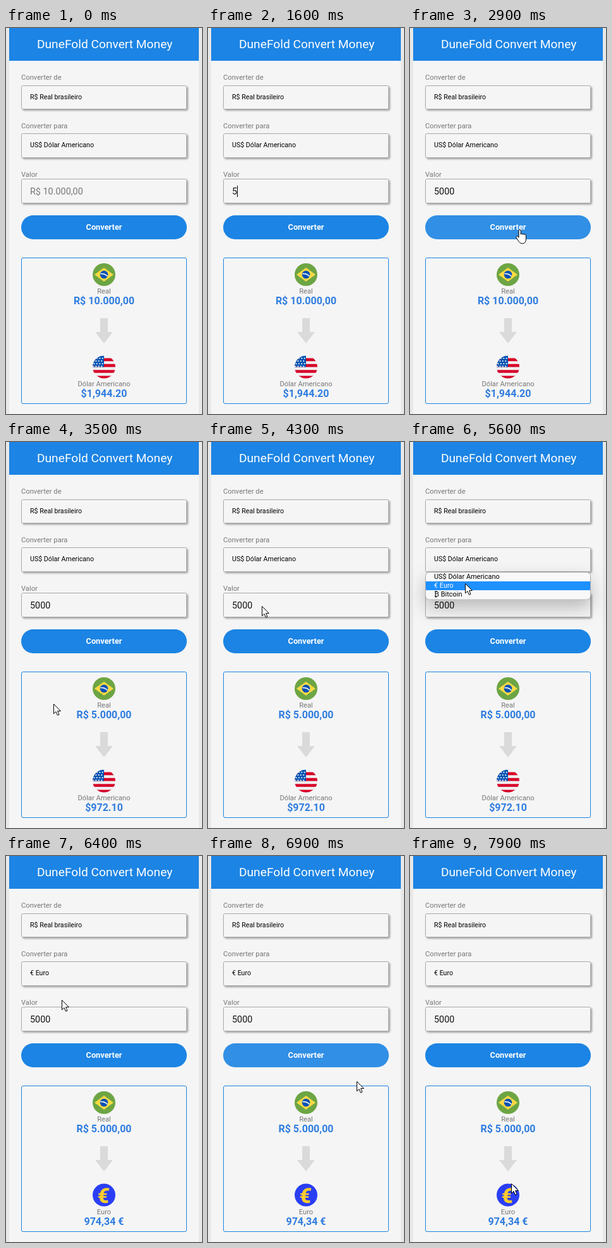
Write an HTML page that moves like this. It is 310 px wide and 612 px high and loops after 8000 ms.

```html
<!DOCTYPE html>
<html lang="pt">
<head>
<meta charset="utf-8">
<title>Convert Money</title>
<style>
  html, body { margin: 0; width: 100%; height: 100%; overflow: hidden; background: #e8e8e8; }
  svg { display: block; }
  text { font: 11.2px Roboto, sans-serif; fill: #777; white-space: pre; }
  .title { font-size: 19.2px; fill: #fff; text-anchor: end; }
  .choice { font-size: 10.67px; fill: #000; }
  .field { fill: #f5f5f5; stroke: #aaa; filter: url(#fieldShadow); }
  .center { text-anchor: middle; }
  .money { font-size: 16px; font-weight: 700; fill: #2f7de0; text-anchor: middle; }
  .action { font-size: 12.8px; font-weight: 700; fill: #fff; text-anchor: middle; }
  .option { font-size: 10.95px; fill: #000; }
  #amount { font-size: 14.4px; }
  .pointer { fill: #fff; stroke: #000; stroke-linejoin: round; }
</style>
</head>
<body>
<svg width="310" height="612" viewBox="0 0 310 612">
  <defs>
    <filter id="fieldShadow" x="-10%" y="-40%" width="120%" height="180%">
      <feDropShadow dx="2" dy="2" stdDeviation="1.5" flood-opacity=".35"/>
    </filter>
    <filter id="menuShadow" x="-30%" y="-150%" width="160%" height="450%">
      <feDropShadow dx="0" dy="12" stdDeviation="14" flood-opacity=".25"/>
    </filter>
    <clipPath id="menuClip"><rect x="25" y="207" width="260" height="43" rx="6"/></clipPath>
    <clipPath id="disc"><circle r="18"/></clipPath>
  </defs>

  <rect x="5" width="300" height="612" fill="#f5f5f5"/>
  <rect x="5" width="300" height="52" fill="#1c84e4"/>
  <text class="title" x="263.3" y="32">DuneFold Convert Money</text>

  <text x="24" y="82">Converter de</text>
  <rect class="field" x="24.5" y="91.5" width="261" height="37" rx="2"/>
  <text class="choice" x="38" y="113">R$ Real brasileiro</text>

  <text x="24" y="159">Converter para</text>
  <rect class="field" x="24.5" y="167.5" width="261" height="38" rx="2"/>
  <text class="choice" id="target" x="38" y="189"></text>

  <text x="24" y="236">Valor</text>
  <rect class="field" x="24.5" y="239.5" width="261" height="38" rx="2"/>
  <text id="amount" x="38" y="264"></text>
  <rect id="caret" y="250" width="1" height="18"/>

  <rect id="button" x="24" y="297" width="262" height="38" rx="19" fill="#1c84e4"/>
  <text class="action" x="155" y="320">Converter</text>

  <rect x="24.5" y="364.5" width="261" height="231" rx="2.5" fill="none" stroke="#1c84e4"/>
  <g transform="translate(155 391)">
    <circle r="18" fill="#6da544"/>
    <path d="M0-11L15 0L0 11L-15 0Z" fill="#ffda44"/>
    <circle r="6.3" fill="#0052b4"/>
    <path d="M-5.6-1.3Q1-2.2 5.4 2.6" fill="none" stroke="#f0f0f0" stroke-width="1.8"/>
  </g>
  <text class="center" x="155" y="421">Real</text>
  <text class="money" id="fromMoney" x="155" y="438"></text>

  <path d="M149 460H161V482H169L155 500L141 482H149Z" fill="#dadada"/>

  <g transform="translate(155 537.5)">
    <g id="dollarIcon" clip-path="url(#disc)">
      <circle r="18" fill="#f0f0f0"/>
      <path d="M-18-11.7H18M-18-2.3H18M-18 7H18M-18 16.4H18" stroke="#d80027" stroke-width="4.7"/>
      <path d="M-18-18H0V0H-18Z" fill="#0052b4"/>
      <path id="stars" fill="#f0f0f0"/>
    </g>
    <g id="euroIcon">
      <circle r="18" fill="#2a3ef5"/>
      <text class="center" x="-1" y="12" style="font-size:33px;font-weight:900;fill:#fccd2d"
        transform="skewX(-5)">€</text>
    </g>
  </g>
  <text class="center" id="currency" x="155" y="568"></text>
  <text class="money" id="toMoney" x="155" y="585"></text>

  <g id="menu">
    <rect x="24.5" y="206.5" width="261" height="43.5" rx="6" fill="#f8f8f8" stroke="#aaa"
      filter="url(#menuShadow)"/>
    <rect id="highlight" x="25" width="260" height="14" fill="#1e90ff" clip-path="url(#menuClip)"/>
    <text class="option" x="38" y="217">US$ Dólar Americano</text>
    <text class="option" x="38" y="231">€ Euro</text>
    <text class="option" x="38" y="245">₿ Bitcoin</text>
  </g>

  <g id="cursor">
    <path class="pointer" id="arrow" d="M.5.5V15.8L4 12.5L6.5 18.3L9 17.2L6.6 11.6H11.4Z"/>
    <path class="pointer" id="hand" d="M5 13V2.2a1.6 1.6 0 0 1 3.2 0V8.2a1.5 1.5 0 0 1 2.9.2a1.4 1.4 0 0 1 2.7.7a1.3 1.3 0 0 1 2.6.8V15.5Q16.4 22.8 10.6 22.8Q7 22.8 5 19.5L1 13.3C.1 11.7 2 10.4 3.2 11.5Z"/>
  </g>
</svg>
<script>
  const LOOP = 8000, STEP = 100;
  const $ = id => document.getElementById(id);
  const show = (id, on) => $(id).setAttribute('visibility', on ? 'visible' : 'hidden');
  const between = (t, a, b) => t >= a && t < b;

  // Cursor path: time, x, y
  const path = [
    [2800, 167, 319], [3300, 167, 319], [3400, 112, 380], [3500, 75, 415], [3800, 75, 415],
    [3900, 80, 390], [4000, 81, 368], [4100, 81, 368], [4200, 82, 345], [4300, 85, 260],
    [4400, 89, 188], [4900, 89, 188], [5000, 86, 187], [5200, 52, 205], [5400, 86, 217],
    [5500, 86, 217], [5600, 87, 224], [5800, 88, 228], [6700, 88, 228], [6800, 190, 312],
    [6900, 235, 357], [7000, 255, 417], [7100, 255, 417], [7200, 262, 440], [7400, 240, 535],
    [7500, 200, 563], [7600, 163, 562], [7700, 147, 545], [7900, 160, 519], [8000, 160, 519]
  ];

  function cursorAt(t) {
    const next = path.findIndex(key => key[0] > t);
    const [t0, x0, y0] = path[next - 1], [t1, x1, y1] = path[next];
    const k = (t - t0) / (t1 - t0);
    return [x0 + (x1 - x0) * k, y0 + (y1 - y0) * k];
  }

  let stars = '';
  for (let row = 0; row < 4; row++)
    for (let col = 0; col < 4; col++)
      stars += `M${-15.5 + col * 4.4 - (row % 2) * 1.5} ${-15 + row * 4.2}l1.5 1.3l-1.5 1.3l-1.5-1.3z`;
  $('stars').setAttribute('d', stars);

  function draw(t) {
    const typed = t < 1600 ? '' : t < 2000 ? '5' : t < 2200 ? '500' : '5000';
    $('amount').textContent = typed || 'R$ 10.000,00';
    $('amount').style.fill = typed ? '#111' : '#777';
    $('caret').setAttribute('x', Math.floor(38 + typed.length * 8.09));
    show('caret', between(t, 700, 1200) || between(t, 1600, 2700));

    const pressed = between(t, 3100, 3200);
    const hover = between(t, 2800, 3400) || between(t, 6800, 7000);
    $('button').setAttribute('opacity', pressed ? .8 : hover ? .9 : 1);

    const converted = t >= 3200, euro = t >= 6300;
    $('target').textContent = t >= 6200 ? '€ Euro' : 'US$ Dólar Americano';
    $('fromMoney').textContent = converted ? 'R$ 5.000,00' : 'R$ 10.000,00';
    $('toMoney').textContent = euro ? '974,34 €' : converted ? '$972.10' : '$1,944.20';
    $('currency').textContent = euro ? 'Euro' : 'Dólar Americano';
    show('dollarIcon', !euro);
    show('euroIcon', euro);

    const chosen = t >= 5600 ? 1 : 0;
    show('menu', between(t, 4500, 6200));
    $('highlight').setAttribute('y', 207 + chosen * 14);
    document.querySelectorAll('.option').forEach((option, i) => {
      option.style.fill = i === chosen ? '#fff' : '#000';
    });

    const visible = t >= 2800;
    const hand = between(t, 2800, 3400) || between(t, 4400, 5200) || between(t, 6800, 6900);
    show('arrow', visible && !hand);
    show('hand', visible && hand);
    if (visible) $('cursor').setAttribute('transform', `translate(${cursorAt(t).map(Math.round)})`);
  }

  const start = performance.now();
  function tick() {
    const t = (performance.now() - start) % LOOP;
    draw(Math.floor(t / STEP) * STEP);
    requestAnimationFrame(tick);
  }
  tick();
</script>
</body>
</html>
```
